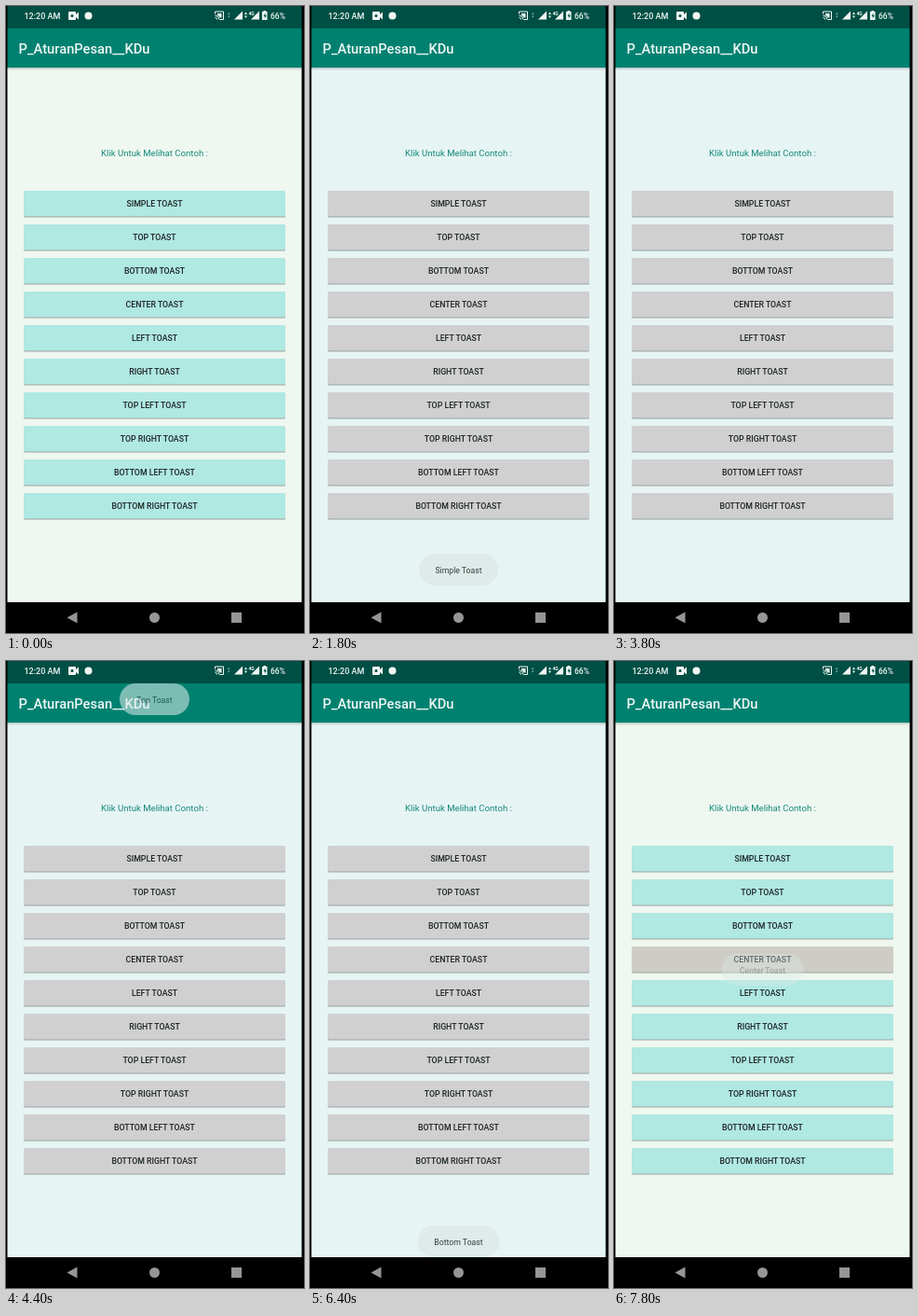
An HTML page that plays this animation: 320 by 672 pixels, repeating every 8000 ms.

```html
<!DOCTYPE html>
<html lang="id">
<head>
<meta charset="utf-8">
<title>Toast</title>
<style>
html, body { margin: 0; width: 100%; height: 100%; overflow: hidden; background: #000; }
svg { display: block; width: 100%; height: 100%; }
text { font-family: Roboto, "Noto Sans", sans-serif; }
.mid { text-anchor: middle; }
.button rect { filter: drop-shadow(0 1px .7px #0005); }
.button text { font-size: 8.75px; font-weight: 500; fill: #1c2423; }
.toast rect { fill: #dfebe9; }
.toast text { font-size: 8.7px; fill: #35403e; }
</style>
</head>
<body>
<svg viewBox="0 0 320 672">
  <defs>
    <linearGradient id="shade" x2="0" y2="1">
      <stop stop-color="#000" stop-opacity=".2"/>
      <stop offset="1" stop-color="#000" stop-opacity="0"/>
    </linearGradient>
  </defs>
  <rect width="320" height="672"/>
  <rect id="page" x="1.5" y="66" width="316" height="573"/>
  <rect x="1.5" y="66" width="316" height="3" fill="url(#shade)"/>
  <rect x="1.5" width="316" height="24" fill="#004f44"/>
  <rect x="1.5" y="24" width="316" height="42" fill="#008170"/>

  <g fill="#f0f7f5">
    <text x="19.5" y="13.5" font-size="9" font-weight="500">12:20 AM</text>
    <path d="M68 6h6q1 0 1 1v2l3-2.500v8l-3-2.500v2q0 1-1 1h-6q-1 0-1-1v-7q0-1 1-1z"/>
    <circle cx="71" cy="10.500" r="1.500" fill="#004f44"/>
    <circle cx="88.500" cy="10.500" r="4"/>
    <path d="M224.500 8.500v-2.500h9v8.500h-4M224.500 10q4 .5 4.500 4.500M224.500 12.300q2 .2 2.200 2.200" fill="none" stroke="#f0f7f5"/>
    <path d="M227 8h4.500v4.500h-2q-.5-2-2.500-2.500z"/>
    <path d="M237.800 9l1.400-2 1.400 2zm0 1.500h2.800l-1.400 2z" opacity=".55"/>
    <path d="M245 14.500l9-9v9zM263 14.500l9-9v9z"/>
    <path d="M256 9l1.500-2.500 1.500 2.500zm0 1.500h3l-1.500 2.500z"/>
    <text x="260.500" y="9.500" font-size="5" font-weight="700">4G</text>
    <path d="M276.500 5h2.500v1h1.500v9h-5.500v-9h1.500z"/>
    <path d="M278.500 7.500l-2 3.500h1.300v2.500l2-3.500h-1.300z" fill="#004f44"/>
    <text x="284" y="13.500" font-size="8.500" font-weight="500">66%</text>
    <text x="13.500" y="50.500" font-size="14.700" font-weight="500">P_AturanPesan__KDu</text>
  </g>

  <text class="mid" x="159.500" y="161" font-size="9.600" fill="#16897a">Klik Untuk Melihat Contoh :</text>
  <g id="buttons"></g>
  <g id="toasts"></g>

  <g fill="#969696">
    <path d="M65.500 655.500l11-6v12z"/>
    <circle cx="159.500" cy="655.500" r="5.500"/>
    <rect x="242" y="650" width="11" height="11"/>
  </g>
</svg>
<script>
const LOOP = 8000;
const NS = "http://www.w3.org/2000/svg";
const MINT = "#b0e8e2", GREY = "#d0d0d0", PRESSED = "#cdcdc6";
const labels = ["SIMPLE", "TOP", "BOTTOM", "CENTER", "LEFT", "RIGHT",
  "TOP LEFT", "TOP RIGHT", "BOTTOM LEFT", "BOTTOM RIGHT"];

function add(parent, tag, attrs, content = "") {
  const el = document.createElementNS(NS, tag);
  for (const key in attrs) el.setAttribute(key, attrs[key]);
  el.textContent = content;
  return parent.appendChild(el);
}

// Holds each [time, value] until the next one.
function play(el, prop, steps) {
  const frames = steps.map(([time, value]) => ({ offset: time / LOOP, [prop]: value, easing: "step-end" }));
  frames.push({ offset: 1, [prop]: steps.at(-1)[1] });
  el.animate(frames, { duration: LOOP, iterations: Infinity });
}

const page = document.getElementById("page");
play(page, "fill", [[0, "#eef7f0"], [600, "#e6f4f4"], [7600, "#eef7f0"]]);

const buttons = document.getElementById("buttons");
labels.forEach((label, i) => {
  const y = 198 + i * 36;
  const g = add(buttons, "g", { class: "button" });
  const face = add(g, "rect", { x: 19, y, width: 281, height: 27.5, rx: 1.5 });
  add(g, "text", { class: "mid", x: 159.5, y: y + 17 }, label + " TOAST");
  const steps = [[0, MINT], [600, GREY], [7600, MINT]];
  if (label === "SIMPLE") steps.splice(1, 0, [400, PRESSED]);
  if (label === "CENTER") steps[2][1] = PRESSED;
  play(face, "fill", steps);
});

const toasts = [
  ["Simple Toast", 587, 85, [[0, 0], [600, .5], [800, 1], [3000, .5], [3200, 0]]],
  ["Top Toast", 24, 75, [[0, 0], [4400, .56], [4600, .96], [6000, .4], [6200, 0]]],
  ["Bottom Toast", 605, 88, [[0, 0], [6200, .5], [6400, 1], [7400, .4], [7600, 0]]],
  ["Center Toast", 314, 88, [[0, 0], [7800, .35]]]
];
for (const [label, y, width, steps] of toasts) {
  const g = add(document.getElementById("toasts"), "g", { class: "toast" });
  add(g, "rect", { x: 159.5 - width / 2, y, width, height: 34, rx: 17 });
  add(g, "text", { class: "mid", x: 159.5, y: y + 20.5 }, label);
  play(g, "opacity", steps);
}
</script>
</body>
</html>
```
